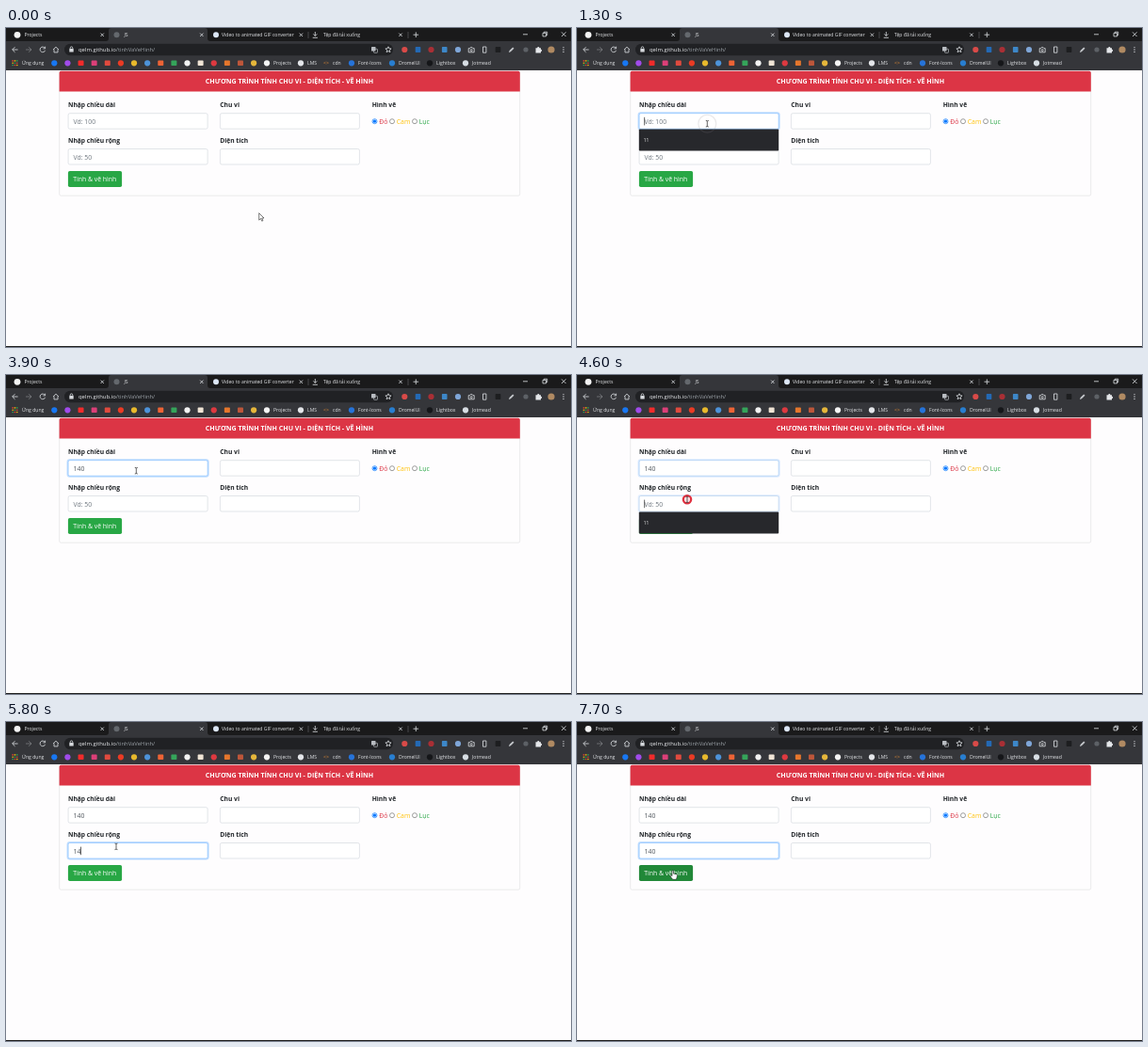
Recreate the animation shown at these times as an HTML page. Size 600 by 339 pixels, loop 8000 ms.

```html
<!DOCTYPE html>
<html lang="vi">
<head>
<meta charset="utf-8">
<title>JS</title>
<style>
  html, body { margin: 0; width: 100%; height: 100%; overflow: hidden; background: #fefdfe; }
  svg { display: block; width: 100vw; height: 100vh; }
  text { font-family: "Open Sans", "Noto Sans", sans-serif; white-space: pre; }
  .ui { font-size: 5.1px; fill: #e4e6e9; }
  .url { font-size: 5.9px; fill: #9aa0a6; }
  .label { font-size: 6.7px; font-weight: 700; fill: #212529; }
  .body { font-size: 6.85px; }
  .hint { font-size: 4.9px; fill: #fff; }
  .line { fill: none; stroke: #d5d8dc; stroke-width: .85; }
  .dim { opacity: .4; }
</style>
</head>
<body>
<svg viewBox="0 0 600 339" preserveAspectRatio="none">
  <rect width="600" height="339" fill="#fefdfe"/>
  <rect y="338" width="600" height="1" fill="#1c1c1c"/>

  <!-- browser frame -->
  <rect width="600" height="45" fill="#35363a"/>
  <rect width="600" height="14" fill="#1a1a1b"/>
  <path d="M106 14q3 0 3-3V3q0-3 3-3h99q3 0 3 3v8q0 3 3 3z" fill="#35363a"/>
  <rect x="62" y="16.8" width="349" height="12.4" rx="6.2" fill="#202124"/>
  <g id="chrome"></g>
  <path class="line" d="M321 4v7M427 4v7" opacity=".3"/>
  <path class="line" d="M432.5 7.2h5.6M435.3 4.4v5.6M549 6.8h5M570 5.4h3.5v3.5H570zM571.2 5.4V4.2h3.5v3.5h-1.2M590 4.4l4.6 4.6m0-4.6L590 9"/>
  <path class="line" d="M12.6 23H6.8m2.7-2.8L6.7 23l2.8 2.8"/>
  <path class="line dim" d="M21 23h5.8m-2.7-2.8l2.8 2.8-2.8 2.8"/>
  <path class="line" d="M41.2 21.2a2.8 2.8 0 1 0 .4 2.6M41.6 19.7v2.2h-2.2"/>
  <path class="line" d="M50 23l3-2.8 3 2.8M51 22.5v3.4h4v-3.4"/>
  <path class="line" d="M68.2 22.2v-1a1.3 1.3 0 0 1 2.6 0v1"/>
  <rect x="67.3" y="22" width="4.4" height="3.6" rx=".4" fill="#d5d8dc"/>
  <rect x="388" y="20" width="4.5" height="4.5" rx=".6" fill="#b9bdc2"/>
  <rect x="390.5" y="22.3" width="4" height="4" rx=".6" fill="none" stroke="#b9bdc2" stroke-width=".7"/>
  <path class="line" d="M406 19.8l.9 2 2.2.2-1.7 1.5.5 2.2-1.9-1.2-1.9 1.2.5-2.2-1.7-1.5 2.2-.2z" stroke-width=".7"/>
  <path d="M562.5 21.2h1.7a1.1 1.1 0 0 1 2.2 0h1.6v1.6a1.1 1.1 0 0 1 0 2.2v1.6h-5.5z" fill="#e4e6e9"/>
  <path d="M534 26l.6-2 3.6-3.6 1.3 1.3-3.6 3.6z" fill="#c6c9cd"/>
  <path class="line" d="M491.2 21.6h1.4l.7-1h1.8l.7 1h1.4v4.2h-6zM506.5 20h3.4v6.2h-3.4z"/>
  <circle class="line" cx="494.2" cy="23.6" r="1"/>

  <!-- card -->
  <rect x="56.7" y="45.9" width="489" height="132.3" rx="1.8" fill="none" stroke="#dedee0" stroke-width=".6"/>
  <path d="M56.6 67.6V47.7q0-1.9 1.9-1.9h485.4q1.9 0 1.9 1.9v19.9z" fill="#dc3545"/>
  <text x="301" y="59.3" text-anchor="middle" font-size="7.05" font-weight="700" fill="#fff">CHƯƠNG TRÌNH TÍNH CHU VI - DIỆN TÍCH - VẼ HÌNH</text>
  <g id="form"></g>
  <rect id="button" x="65.9" y="152" width="57.2" height="17" rx="1.8"/>
  <text class="body" x="71.3" y="163.1" fill="#fff">Tính &amp; vẽ hình</text>

  <g id="menu">
    <rect x="65.8" width="148.4" height="23" rx="1" fill="#27282c"/>
    <text class="hint" x="70.8" y="13.5">11</text>
  </g>
  <rect id="caret" width=".7" height="8.6" fill="#222"/>

  <!-- pointers -->
  <circle id="ring"/>
  <g id="arrow"><path d="M0 0v7.4l1.8-1.6 1.2 2.7 1.2-.5-1.2-2.7h2.3z" fill="#fff" stroke="#222" stroke-width=".6"/></g>
  <g id="beam"><path d="M-1.5-3.3q1.5 0 1.5.8 0-.8 1.5-.8M0-2.5v5M-1.5 3.3q1.5 0 1.5-.8 0 .8 1.5.8" fill="none" stroke="#222" stroke-width=".7"/></g>
  <g id="hand"><path d="M-.8 0q.8-.9 1.6 0v3l3.1.7q.9.3.8 1.3l-.5 2.2-.6 1.9h-3.7l-2.7-3.4q0-1.3 1.2-.9l.8.7z" fill="#fff" stroke="#222" stroke-width=".6"/></g>
</svg>
<script>
const $ = id => document.getElementById(id);

function add(parent, tag, attrs, content = '') {
  const node = document.createElementNS('http://www.w3.org/2000/svg', tag);
  for (const key in attrs) node.setAttribute(key, attrs[key]);
  node.textContent = content;
  parent.append(node);
  return node;
}
const write = (parent, x, y, cls, content, fill) =>
  add(parent, 'text', { x, y, class: cls, ...(fill && { style: `fill:${fill}` }) }, content);
const disc = (x, y, r, fill) => add($('chrome'), 'circle', { cx: x, cy: y, r, fill });
const block = (x, y, w, h, fill) =>
  add($('chrome'), 'rect', { x: x - w / 2, y: y - h / 2, width: w, height: h, rx: .8, fill });
const stroke = d => add($('chrome'), 'path', { class: 'line', d });

function drawChrome() {
  const ui = $('chrome');
  const tabs = [[19.5, 'Projects'], [125.5, 'JS'], [229, 'Video to animated GIF converter'], [337, 'Tệp đã tải xuống']];
  tabs.forEach(([x, title], i) => {
    write(ui, x, 9.2, 'ui', title);
    stroke(`M${100.5 + i * 105.6} 5.6l3.4 3.4m0-3.4l-3.4 3.4`);
  });
  disc(12, 7.3, 3.4, '#f4f4f4');
  disc(117.5, 7.3, 3, '#64686d');
  disc(223, 7.3, 3, '#dce6f5');
  stroke('M328.3 4v4.4m-2-2l2 2 2-2M325.7 10.3h5.2');

  const url = write(ui, 77, 25.1, 'url', '');
  add(url, 'tspan', { fill: '#e8eaed' }, 'qelm.github.io');
  add(url, 'tspan', {}, '/tinhVaVeHinh/');

  const tools = [[423.3, '#d94a48'], [437.5, '#2469b5'], [451.5, '#a92f35'], [465.7, '#3d87c8'], [480, '#7fa6d8'], [522.5, '#1d1e20']];
  tools.forEach(([x, color], i) => i % 2 ? block(x, 23, 5.6, 6, color) : disc(x, 23, 3.1, color));
  disc(552, 23, 2.6, '#5d6166');
  disc(579, 23, 3.6, '#b08a62');
  [20.6, 23, 25.4].forEach(y => disc(592, y, .65, '#dadce0'));

  const dots = ['#ea4335', '#fbbc05', '#34a853'];
  for (let i = 0; i < 9; i++) block(7.2 + i % 3 * 2.3, 34.9 + (i / 3 | 0) * 2.3, 1.6, 1.6, dots[(i + (i / 3 | 0)) % 3]);

  const marks = ['#1877f2', '#a04bea', '#f22b2b', '#dc3f78', '#e04a3e', '#ea3b24', '#e8b92c', '#4d93d9',
    '#ee6335', '#35a45a', '#f2f2f2', '#f0e4d5', '#de3940', '#e5762c', '#bd563a', '#e5b63b'];
  marks.forEach((color, i) => {
    const x = 51.3 + i * 14.12;
    i % 5 > 2 || i === 2 || i === 11 ? block(x, 37.3, 6, 5.4, color) : disc(x, 37.3, 3.1, color);
  });
  const links = [[284, 'Projects', '#f4f4f4'], [320, 'LMS', '#e4e6e9'], [347, 'cdn', ''], [374, 'Font-Icons', '#2673d9'],
    [417, 'DromelUI', '#287ed0'], [457, 'Lightbox', '#151619'], [495, 'Jotmead', '#d7dde3']];
  write(ui, 17, 39.2, 'ui', 'Ứng dụng');
  for (const [x, name, color] of links) {
    write(ui, x, 39.2, 'ui', name);
    color ? disc(x - 7, 37.3, 3.1, color) : write(ui, x - 10, 39.2, 'ui', '<>', '#e28a36');
  }
}

function field(x, y, label, hint = '') {
  const form = $('form');
  write(form, x, y - 6.4, 'label', label);
  const box = { x: x + .1, y, width: 148, height: 16.5, rx: 1.7 };
  const glow = add(form, 'rect', { ...box, fill: 'none', stroke: '#007bff', 'stroke-width': 3.1 });
  const edge = add(form, 'rect', { ...box, fill: '#fff', 'stroke-width': .6 });
  const value = write(form, x + 5.6, y + 11.1, 'body', '');
  return { x, y, hint, glow, edge, value };
}

drawChrome();
const fields = [
  field(66, 90.7, 'Nhập chiều dài', 'Vd: 100'),
  field(66, 128.5, 'Nhập chiều rộng', 'Vd: 50'),
  field(227.3, 90.7, 'Chu vi'),
  field(227.3, 128.5, 'Diện tích')
];
write($('form'), 388.7, 84.3, 'label', 'Hình vẽ');
[[391.5, 'Đỏ', '#dc3545'], [410, 'Cam', '#ffc107'], [434, 'Lục', '#28a745']].forEach(([x, name, color], i) => {
  const paint = i ? '#767676' : '#0075ff';
  add($('form'), 'circle', { cx: x, cy: 99.2, r: 2.5, fill: '#fff', stroke: paint, 'stroke-width': .7 });
  if (!i) add($('form'), 'circle', { cx: x, cy: 99.2, r: 1.6, fill: paint });
  write($('form'), x + 4.8, 101.9, 'body', name, color);
});

const LOOP = 8000, STEP = 100;
const clicks = [1000, 4600];
const typing = [[3000, 3200, 3400], [5300, 5800, 6000]];
const path = [[0, 268.7, 196.7], [900, 138.3, 101.7], [4000, 138.3, 101.7], [4500, 117, 132.3], [6400, 117, 132.3],
  [6800, 239, 93], [7300, 160, 141], [7700, 101.8, 158.2]];

const clamp = v => Math.max(0, Math.min(1, v));
const mix = (a, b, k) => a + (b - a) * k;
const blend = (a, b, k) => `rgb(${a.map((v, i) => Math.round(mix(v, b[i], k)))})`;
const show = (node, on) => node.style.display = on ? '' : 'none';

function pointerAt(t) {
  const i = path.findIndex(([time]) => time > t);
  if (i < 0) return path[path.length - 1].slice(1);
  const [t0, x0, y0] = path[i - 1], [t1, x1, y1] = path[i];
  const k = (t - t0) / (t1 - t0), eased = k * k * (3 - 2 * k);
  return [mix(x0, x1, eased), mix(y0, y1, eased)];
}

function drawPointer(t) {
  const [x, y] = pointerAt(t);
  const inside = (l, top, w, h) => x > l && x < l + w && y > top && y < top + h;
  const kind = inside(66, 152, 57, 17) ? 'hand'
    : fields.some(f => inside(f.x, f.y, 148, 16.5)) ? 'beam' : 'arrow';
  for (const id of ['arrow', 'beam', 'hand']) {
    show($(id), id === kind);
    $(id).setAttribute('transform', `translate(${x} ${y})`);
  }
  $('button').setAttribute('fill', kind === 'hand' ? '#218838' : '#28a745');

  const age = t - clicks.findLast(c => c <= t);
  const on = age >= 0 && age < 500;
  show($('ring'), on);
  if (!on) return;
  const ring = { cx: x, cy: y, r: 4.2 + age * .0175, 'stroke-width': mix(2.2, .8, age / 400),
    stroke: age < 200 ? '#e0303f' : '#8c8589', fill: age ? 'none' : '#fbdfe2', opacity: clamp(1 - age / 370) };
  for (const key in ring) $('ring').setAttribute(key, ring[key]);
}

function drawForm(t) {
  const active = clicks.filter(c => c <= t).length - 1;
  fields.forEach((f, i) => {
    const rise = at => clamp((t - at + 60) / 150) * (t >= at);
    const focus = i < 2 ? rise(clicks[i]) - (i ? 0 : rise(clicks[1])) : 0;
    f.edge.setAttribute('stroke', blend([206, 212, 218], [128, 189, 255], focus));
    f.glow.setAttribute('opacity', focus * .25);
    const count = i < 2 ? typing[i].filter(k => k <= t).length : 0;
    f.value.textContent = count ? '140'.slice(0, count) : f.hint;
    f.value.setAttribute('fill', count ? '#495057' : '#6c757d');
  });
  show($('menu'), false);
  show($('caret'), false);
  if (active < 0) return;

  const { x, y } = fields[active];
  const keys = typing[active].filter(k => k <= t);
  const since = keys.length ? keys[keys.length - 1] : clicks[active];
  show($('menu'), keys.length < 2);
  $('menu').setAttribute('transform', `translate(0 ${y + 16.9})`);
  show($('caret'), Math.floor((t - since) / 500) % 2 === 0);
  $('caret').setAttribute('x', x + 5.4 + keys.length * 3.92);
  $('caret').setAttribute('y', y + 4.1);
}

const start = performance.now();
function frame() {
  const elapsed = (performance.now() - start) % LOOP;
  const t = Math.floor(elapsed / STEP) * STEP;
  drawForm(t);
  drawPointer(t);
  requestAnimationFrame(frame);
}
frame();
</script>
</body>
</html>
```
